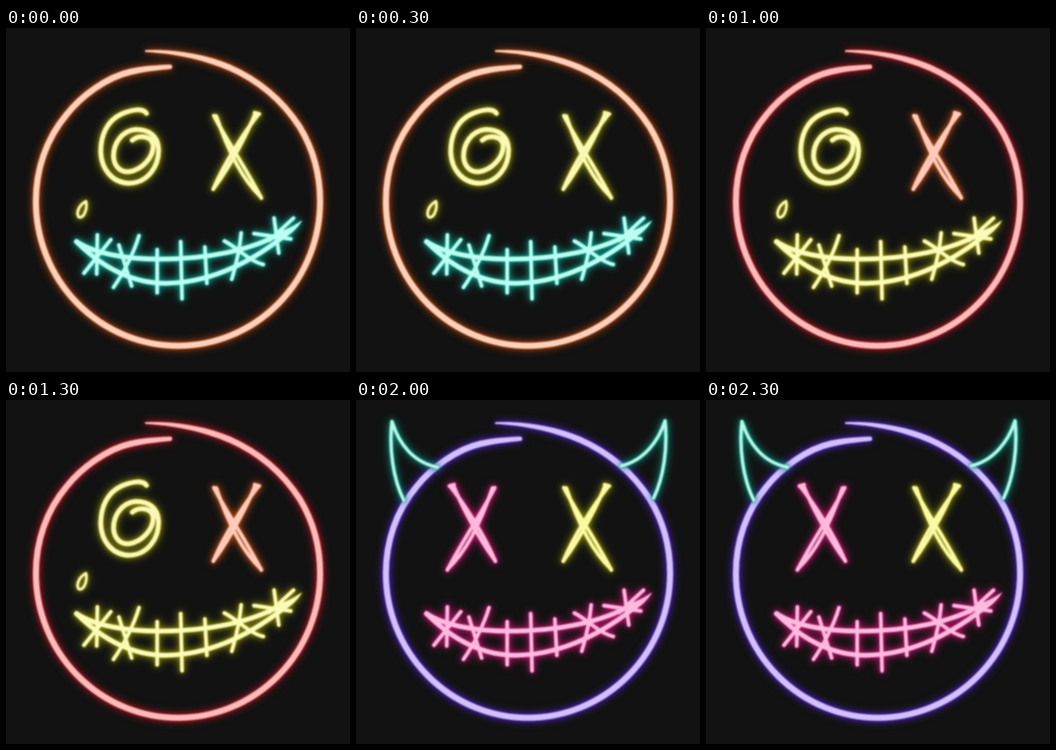
Recreate the animation shown at these times as an HTML page. Size 512 px wide and 512 px high, loop 2500 ms.

```html
<!DOCTYPE html>
<html lang="en">
<head>
<meta charset="utf-8">
<title>Neon face</title>
<style>
  html, body { margin: 0; height: 100%; overflow: hidden; background: #121212; }
  svg { display: block; width: 100vw; height: 100vh; }

  g {
    fill: none;
    stroke: var(--core);
    stroke-linecap: round;
    stroke-linejoin: round;
    animation: 2.5s step-end infinite;
  }
  .neon { filter: blur(1.1px) drop-shadow(0 0 2.5px var(--glow)) drop-shadow(0 0 6px var(--glow)); }
  .taper { fill: var(--core); stroke: none; }

  #ring   { stroke-width: 9; animation-name: ring; }
  #horns  { stroke-width: 5; animation-name: horns; }
  #spiral { stroke-width: 7; animation-name: spiral; }
  #tear   { stroke-width: 4; animation-name: tear; }
  #left   { stroke-width: 5.4; animation-name: left; }
  #right  { stroke-width: 5.4; animation-name: right; }
  #mouth  { stroke-width: 7; animation-name: mouth; }
  #spiral, #tear { --core: #faf9b4; --glow: #86840f; }

  @keyframes ring {
    0%   { --core: #ffd0ba; --glow: #983d10; }
    20%  { --core: #bfd6ff; --glow: #1b4ba4; }
    40%  { --core: #ffbaba; --glow: #9c1820; }
    60%  { --core: #f9f9b2; --glow: #7c7b0e; }
    80%  { --core: #d2c0ff; --glow: #4822ac; }
  }
  @keyframes horns {
    0%, 40%, 60% { visibility: hidden; }
    20%  { visibility: visible; --core: #ffbadd; --glow: #b01868; }
    80%  { visibility: visible; --core: #b4f7e7; --glow: #0c8a78; }
  }
  @keyframes spiral {
    0%, 40% { visibility: visible; }
    20%, 60%, 80% { visibility: hidden; }
  }
  @keyframes tear {
    0%, 40%, 60% { visibility: visible; }
    20%, 80% { visibility: hidden; }
  }
  @keyframes left {
    0%, 40% { visibility: hidden; }
    20%  { visibility: visible; --core: #cabeff; --glow: #4a2bc0; }
    60%  { visibility: visible; --core: #ffbab6; --glow: #b01a1c; }
    80%  { visibility: visible; --core: #ffbadd; --glow: #b81868; }
  }
  @keyframes right {
    0%   { --core: #faf9b2; --glow: #86840f; }
    20%  { --core: #ffd8ba; --glow: #b0560c; }
    40%  { --core: #ffcbba; --glow: #ac4a18; }
    60%  { --core: #d2ffc0; --glow: #3a9614; }
    80%  { --core: #faf9a4; --glow: #86840f; }
  }
  @keyframes mouth {
    0%   { --core: #baffF2; --glow: #0f9686; }
    20%  { --core: #ffbee8; --glow: #b41880; }
    40%  { --core: #fbfbb8; --glow: #86840f; }
    60%  { --core: #ffbef4; --glow: #ac18a0; }
    80%  { --core: #ffbae0; --glow: #b41868; }
  }
</style>
</head>
<body>
<svg viewBox="0 0 512 512">
  <defs>
    <g id="cross">
      <path d="M309.500 130.500C324 160 355 205 380 253"/>
      <path d="M313 131C320 152 341 215 379 251"/>
      <path d="M376 128C355 155 325 200 308.500 240"/>
      <path d="M371 127C362 150 338 200 309 239M370 126L377 128"/>
    </g>
  </defs>

  <g id="ring" class="neon">
    <path class="taper" d="M207 33C250 31 298 39 335 55L331 63C290 46 250 38 207 35.500Z"/>
    <path d="M332 58.500C374 77 411 107 437 147C457 180 467.500 215 467.500 258A211.500 215 0 0 1 44.500 258C44.500 210 60 165 90 129C112 101 150 73 186 65"/>
    <path class="taper" d="M184 61C204 56 224 55.500 244 54.500A3 3 0 0 1 244 61C224 63 206 65 187 69.500Z"/>
  </g>

  <g id="horns" class="neon">
    <path d="M71 149C55 117 49 72 53.500 32C64 66 86 93 121 100"/>
    <path d="M443 146C458 115 464 72 460 31C450 62 428 90 395 98"/>
  </g>

  <g id="spiral" class="neon">
    <path d="M209 127C204 119 188 121 172 128C150 138 141 160 141 184C142 212 160 231 184 231C211 230 228 206 227 180C226 160 212 151 193 151C172 153 160 172 160 191C161 207 171 215 183 214C203 211 220 192 219 174C217 161 199 158 188 167"/>
  </g>

  <g id="tear" class="neon">
    <path d="M119 258C109 263 104 275 108 281C114 285 122 272 119 258Z"/>
  </g>

  <g id="left" class="neon"><use href="#cross" transform="matrix(-1 0 0 1 516 0)"/></g>
  <g id="right" class="neon"><use href="#cross"/></g>

  <g id="mouth" class="neon">
    <path d="M105 318C132 336 180 344 228 344C300 344 366 331 412 304"/>
    <path d="M105 318C128 341 174 380 238 380C304 379 362 350 412 311"/>
    <path class="taper" d="M408 303C422 298 432 292 441 286C434 298 424 307 411 315Z"/>
    <g stroke-width="5.400">
      <path d="M136 308L135 366M156 315L116 365"/>
      <path d="M198 309C190 336 174 366 160 386M168 323L187 384"/>
      <path d="M225 330V394M260 318L262 403M296 326L299 380"/>
      <path d="M350 305C348 330 342 354 336 374M325 317C346 328 362 347 383 352"/>
      <path d="M399 283L406 335M428 283L392 316M369 306L424 314"/>
    </g>
  </g>
</svg>
</body>
</html>
```
